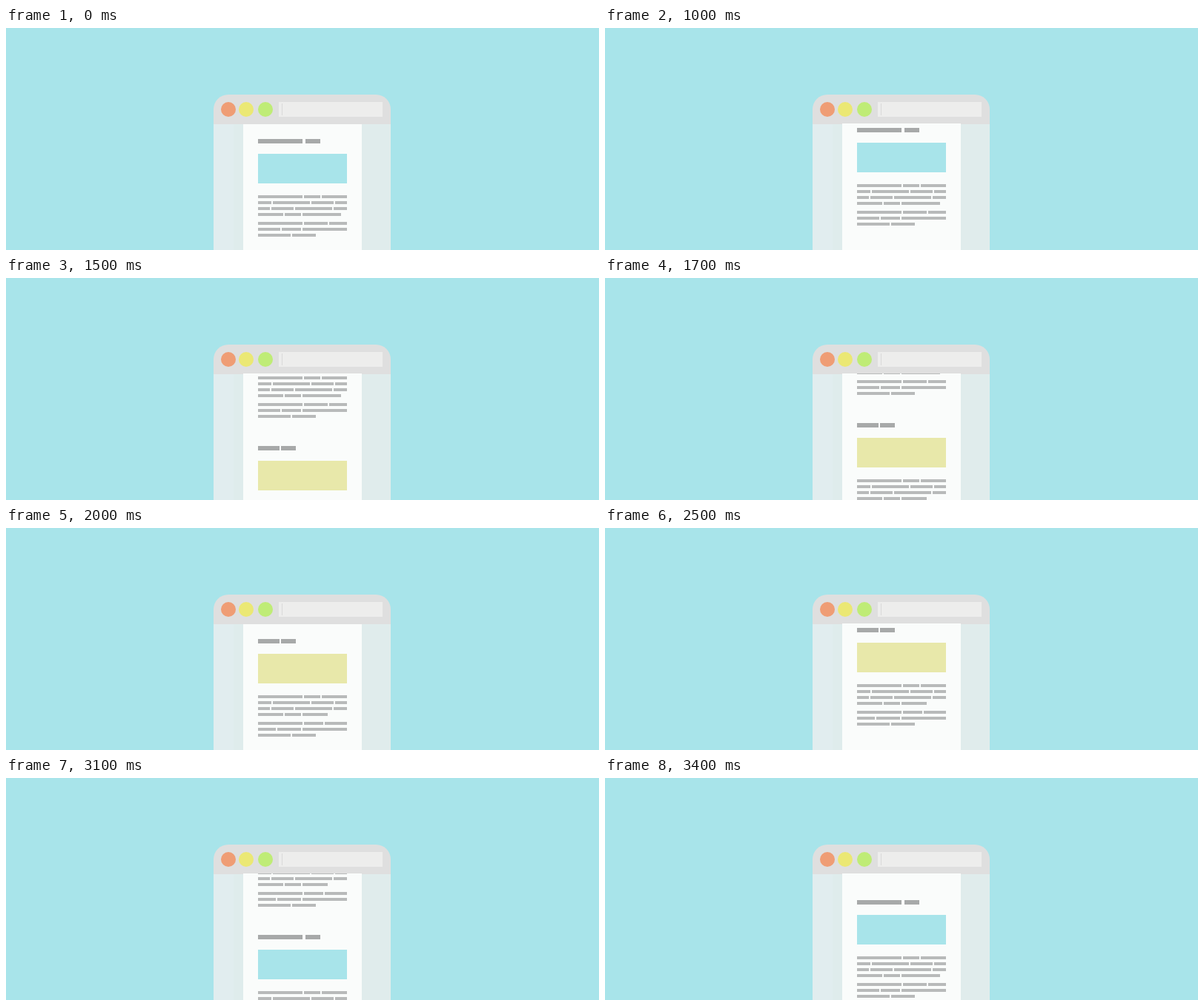
These frames come from a looping animation (800x300 px, 3.5 s). An HTML page with a canvas:

```html
<!DOCTYPE html>
<html lang="en">
<head>
<meta charset="utf-8">
<title>Scrolling page</title>
<style>
html, body { margin: 0; width: 100%; height: 100%; overflow: hidden; background: #a8e4ea; }
canvas { display: block; }
</style>
</head>
<body>
<canvas id="stage" width="800" height="300"></canvas>
<script>
const ctx = document.getElementById('stage').getContext('2d');
const SKY = '#a8e4ea';
const LOOP = 3500, STEP = 100;
const SECTION = 170;   // height of one article
const STEPS = 11;      // steps needed to scroll one article

// Each row lists its word edges; words are split by a 2px gap.
const rowsStart = [[60, 84, 120], [18, 70, 102, 120], [16, 48, 100, 120]];
const articles = [
  {
    title: [[0, 60], [64, 20]], color: SKY,
    first: [...rowsStart, [34, 58, 112]],
    second: [[60, 94, 120], [30, 58, 120], [44, 78]]
  },
  {
    title: [[0, 29], [31, 20]], color: '#e8e8aa',
    first: [...rowsStart, [34, 58, 94]],
    second: [[60, 88, 120], [24, 58, 120], [44, 78]]
  }
];

function rect(color, x, y, w, h) {
  ctx.fillStyle = color;
  ctx.fillRect(x, y, w, h);
}

function circle(color, x, y, r) {
  ctx.fillStyle = color;
  ctx.beginPath();
  ctx.arc(x, y, r, 0, Math.PI * 2);
  ctx.fill();
}

function paragraph(rows, y) {
  rows.forEach((ends, i) => {
    let x = 0;
    for (const end of ends) {
      rect('#b8baba', 340 + x, y + i * 8, end - x, 4);
      x = end + 2;
    }
  });
}

function article(a, y) {
  for (const [x, w] of a.title) rect('#a7a9a9', 340 + x, y, w, 6);
  rect(a.color, 340, y + 20, 120, 40);
  paragraph(a.first, y + 76);
  paragraph(a.second, y + 112);
}

function browser() {
  rect(SKY, 0, 0, 800, 300);
  ctx.fillStyle = '#dfdfdf';
  ctx.beginPath();
  ctx.roundRect(280, 90, 239, 40, [20, 20, 0, 0]);
  ctx.fill();
  circle('#ef9d75', 300, 110, 10);
  circle('#ebe874', 324, 110, 10);
  circle('#bfec76', 350, 110, 10);
  rect('#ededec', 368, 100, 140, 20);
  rect('#d9d9d9', 372, 102, 1, 16);
  rect('#e1edef', 280, 130, 27, 170);
  rect('#dfecec', 307, 130, 13, 170);
  rect('#e0ecec', 480, 130, 39, 170);
}

function scrollAt(t) {
  const count = start => Math.max(0, Math.min(STEPS, Math.floor((t - start) / STEP) + 1));
  return Math.round((count(1000) + count(2500)) * SECTION / STEPS);
}

function draw(t) {
  const scroll = scrollAt(t);
  const top = scroll % SECTION ? 129 : 130;   // page sits 1px higher while moving
  browser();
  ctx.save();
  ctx.beginPath();
  ctx.rect(320, top, 160, 300 - top);
  ctx.clip();
  rect('#fafcfb', 320, top, 160, 300 - top);
  for (let i = 0; i < 4; i++) article(articles[i % 2], 150 + i * SECTION - scroll);
  ctx.restore();
}

const begin = performance.now();
function tick() {
  draw((performance.now() - begin) % LOOP);
  requestAnimationFrame(tick);
}
tick();
</script>
</body>
</html>
```
